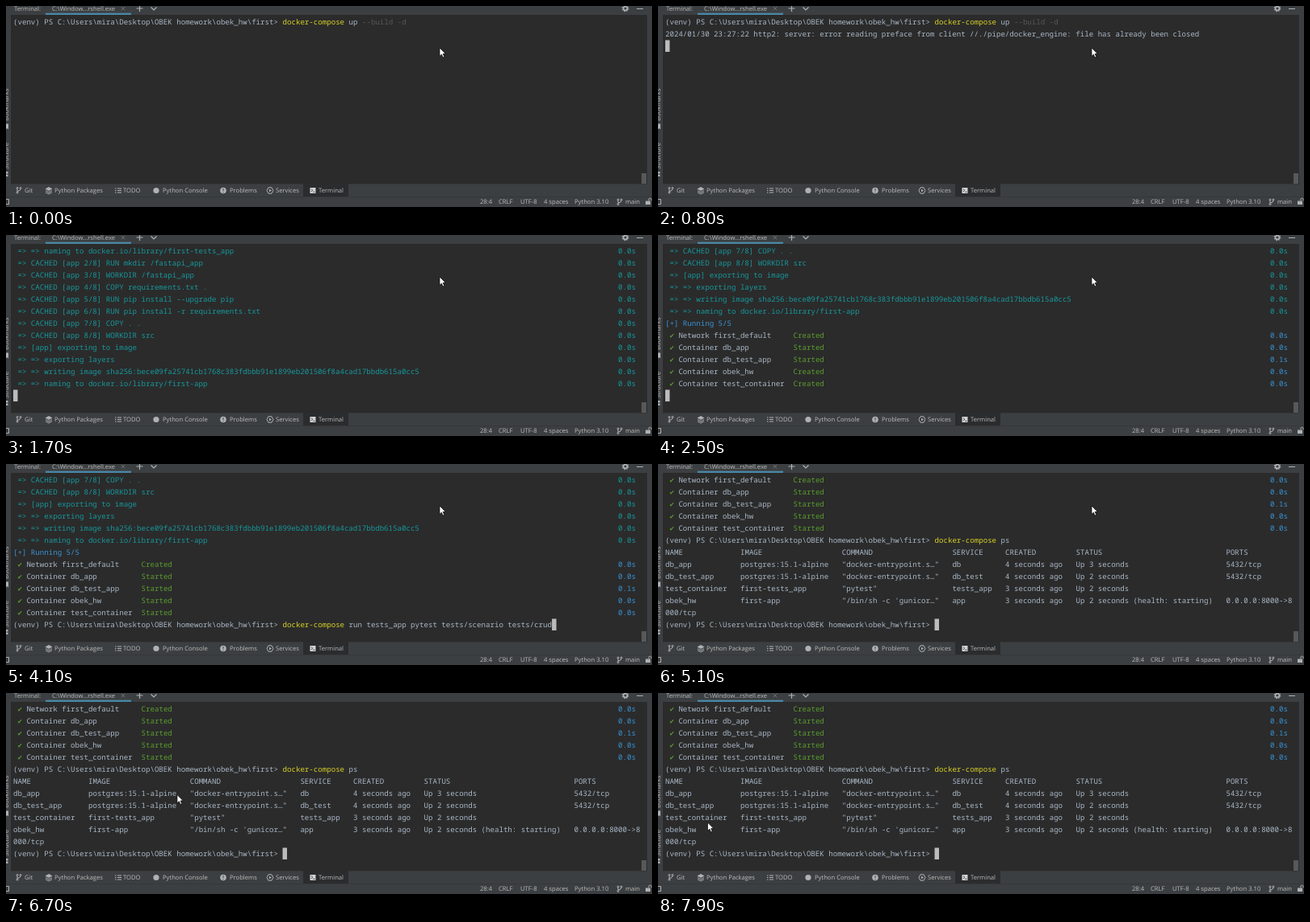
Recreate the animation shown at these times as an HTML page. Size 800 by 250 pixels, loop 8 s.

```html
<!DOCTYPE html>
<html lang="en">
<head>
<meta charset="utf-8">
<title>Terminal session</title>
<style>
html, body { margin: 0; width: 100%; height: 100%; overflow: hidden; background: #3c3f41; }
svg { display: block; width: 800px; height: 250px; }
text { white-space: pre; text-rendering: geometricPrecision; }
#ui text { font: 7.65px "Open Sans", "Noto Sans", sans-serif; fill: #bbb; }
#term text { font: 9.12px "Noto Sans Mono", "DejaVu Sans Mono", monospace; }
.line { fill: none; stroke: #afb1b3; }
</style>
</head>
<body>
<svg viewBox="0 0 800 250">
  <defs>
    <g id="branch" class="line">
      <path d="M-2 -1.5V2M2 -1.5Q2 1 -2 1.5"/>
      <circle cx="-2" cy="-2.5" r="1"/><circle cx="2" cy="-2.5" r="1"/><circle cx="-2" cy="3" r="1"/>
    </g>
  </defs>
  <rect width="800" height="250" fill="#3c3f41"/>
  <rect x="6" y="11" width="788" height="210" fill="#2b2b2b"/>
  <rect x="787" y="208" width="6" height="13" fill="#585858"/>
  <g id="term"></g>
  <g id="ui">
    <rect x="49" y="8.7" width="106" height="2.3" fill="#4a88a7"/>
    <g class="line">
      <path d="M142.8 1L147.2 5.4M147.2 1L142.8 5.4" stroke="#777" stroke-width=".9"/>
      <path d="M161.5 3H169.5M165.5 -1V7M179.5 1.5L183 5L186.5 1.5M781 3.5H789" stroke-width="1.2"/>
      <circle cx="767" cy="3" r="2.4" stroke-width="1.6"/>
      <circle cx="767" cy="3" r="3.7" stroke-width="1.2" stroke-dasharray="1.5 1.4"/>
    </g>
    <path d="M6 221.5H794M0 237.5H800" stroke="#353739"/>
    <rect x="368" y="221" width="56" height="16" fill="#2a2c2d"/>
    <use href="#branch" x="16" y="229"/>
    <g fill="#afb1b3">
      <path d="M48.5 227.5L53 225L57.5 227.5L53 230Z"/>
      <path d="M49 229.6L53 231.8L57 229.6M49 231.7L53 233.9L57 231.7" class="line"/>
      <path d="M135 227H136.5M138 227H143M135 229.5H136.5M138 229.5H143M135 232H136.5M138 232H143" class="line"/>
      <circle cx="186" cy="229.5" r="3.6"/>
      <circle cx="269" cy="229.5" r="3.8"/>
      <path d="M269 227V230M269 231V232" stroke="#3c3f41"/>
      <path d="M325 225.8H329L331 229.5L329 233.2H325L323 229.5Z" class="line"/>
      <path d="M326 227.7L329 229.5L326 231.3Z"/>
      <rect x="376.5" y="226" width="7" height="7" fill="#d0d2d3"/>
      <path d="M378 227.5L379.8 229.2L378 231M380.3 231.3H382.5" fill="none" stroke="#2a2c2d" stroke-width=".8"/>
      <path d="M-3 240.5H3.5V246.5H-3" class="line"/>
      <path d="M0 146.5H3V153.5L1.4 152L0 153.5Z"/>
      <path d="M0 206H2.5V208.5H0ZM0 209.5H2.5V212H0Z"/>
      <rect x="792" y="242.5" width="6" height="4.5"/>
      <path d="M796 242V240.5Q796 239 797.5 239Q799 239 799 240.5V242" class="line"/>
    </g>
    <use href="#branch" x="760" y="243.5"/>
    <text transform="translate(3 143) rotate(-90)">Bookmarks</text>
    <text transform="translate(3 203) rotate(-90)">Structure</text>
  </g>
  <path id="mouse" d="M0 0V10.4L2.4 8.2L4 12L5.8 11.2L4.2 7.5H7.4Z" fill="#fff" stroke="#000" stroke-width=".7"/>
</svg>
<script>
const NS = "http://www.w3.org/2000/svg";
const LOOP = 8000, CELL = 5.468, LEFT = 9, TOP = 12.5, ROW = 15, ROWS = 13;
const GREY = "#a9b7c6", TEAL = "#17979b", BLUE = "#3993d4", GREEN = "#5a9c2e", YELLOW = "#d9d126", DIM = "#555759";
const term = document.getElementById("term");
const mouse = document.getElementById("mouse");

function add(parent, tag, attrs, text = "") {
  const el = document.createElementNS(NS, tag);
  for (const k in attrs) el.setAttribute(k, attrs[k]);
  el.textContent = text;
  parent.append(el);
}

const labels = [
  [10, 6, "Terminal:"], [57, 6, "C:\\Window...rshell.exe"],
  [23, 232.3, "Git"], [60, 232.3, "Python Packages"], [145, 232.3, "TODO"], [194, 232.3, "Python Console"],
  [277, 232.3, "Problems"], [334, 232.3, "Services"], [387, 232.3, "Terminal"],
  [587, 246.3, "28:4"], [610, 246.3, "CRLF"], [637, 246.3, "UTF-8"], [666, 246.3, "4 spaces"],
  [704, 246.3, "Python 3.10"], [767, 246.3, "main"]
];
for (const [x, y, s] of labels) add(document.getElementById("ui"), "text", { x, y }, s);

// A line is a list of [column, text, colour].
const PROMPT = "(venv) PS C:\\Users\\mira\\Desktop\\OBEK homework\\obek_hw\\first> ";
const END = PROMPT.length;
const plain = s => [[0, s, GREY]];
const prompt = (args, hint = "") => {
  const line = plain(PROMPT);
  if (args) line.push([END, "docker-compose", YELLOW], [END + 15, args, GREY]);
  if (hint) line.push([END + 16 + args.length, hint, DIM]);
  return line;
};
const task = s => [[1, "=> " + s, TEAL], [137, "0.0s", TEAL]];

const steps = ["RUN mkdir /fastapi_app", "WORKDIR /fastapi_app", "COPY requirements.txt .",
  "RUN pip install --upgrade pip", "RUN pip install -r requirements.txt", "COPY . .", "WORKDIR src"];
const service = (name, sha) => [
  ...steps.map((s, i) => `CACHED [${name} ${i + 2}/8] ${s}`),
  `[${name}] exporting to image`, "=> exporting layers",
  "=> writing image sha256:" + sha, "=> naming to docker.io/library/first-" + name
].map(task);
const build = [
  [[0, "[+] Building 1.2s (20/20) FINISHED", BLUE]],
  task("[app internal] load build definition from Dockerfile"),
  task("[app internal] load .dockerignore"),
  ...service("tests_app", "4c1d70a93be25f8860b1f7e2ad935c64e08b1f92d7356ac0e41b98f25d70c3a6"),
  ...service("app", "bece09fa25741cb1768c383fdbbb91e1899eb201506f8a4cad17bbdb615a0cc5")
];

const units = ["Network first_default", "Container db_app", "Container db_test_app",
  "Container obek_hw", "Container test_container"];
function running(t) {
  const state = i => i && t >= (i < 3 ? 2300 : 2800) ? "Started" : "Created";
  return [
    [[0, "[+] Running 5/5", BLUE]],
    ...units.map((s, i) => [[1, "✔", GREEN], [3, s, GREY], [29, state(i), GREEN], [137, i === 2 ? "0.1s" : "0.0s", BLUE]])
  ];
}

const cols = [0, 17, 40, 65, 77, 93, 127];
const table = [
  "NAME|IMAGE|COMMAND|SERVICE|CREATED|STATUS|PORTS",
  'db_app|postgres:15.1-alpine|"docker-entrypoint.s…"|db|4 seconds ago|Up 3 seconds|5432/tcp',
  'db_test_app|postgres:15.1-alpine|"docker-entrypoint.s…"|db_test|4 seconds ago|Up 2 seconds|5432/tcp',
  'test_container|first-tests_app|"pytest"|tests_app|3 seconds ago|Up 2 seconds|',
  `obek_hw|first-app|"/bin/sh -c 'gunicor…"|app|3 seconds ago|Up 2 seconds (health: starting)|0.0.0.0:8000->8`,
  "000/tcp"
].map(r => r.split("|").map((s, i) => [cols[i], s, GREY]));

function screen(t) {
  const lines = [prompt("up", "--build -d")];
  let caret = 0;
  if (t >= 600) lines.push(plain("2024/01/30 23:27:22 http2: server: error reading preface from client //./pipe/docker_engine: file has already been closed"));
  if (t >= 1000) lines.push(...build.slice(0, (t - 900) / 100 * 4));
  if (t >= 1900) lines.push(...running(t));
  if (t < 300) return { lines, caret: -1 };
  if (t < 3000) lines.push([]);
  else {
    const args = t < 3700 ? "" : t < 4400 ? "run tests_app pytest tests/scenario tests/crud" : "ps";
    lines.push(prompt(args));
    caret = END + (args && 15 + args.length);
    if (t >= 4700 && t < 5000) { lines.push([]); caret = 0; }
    if (t >= 5000) { lines.push(...table, prompt("")); caret = END; }
  }
  return { lines, caret };
}

function draw(t) {
  const { lines, caret } = screen(t);
  const view = lines.slice(-ROWS);
  term.replaceChildren();
  view.forEach((line, row) => {
    for (const [col, s, fill] of line)
      add(term, "text", { x: LEFT + col * CELL, y: TOP + row * ROW + 10.8, fill }, s);
  });
  if (caret >= 0)
    add(term, "rect", { x: LEFT + caret * CELL, y: TOP + (view.length - 1) * ROW, width: CELL, height: 14.5, fill: "#bbb" });
}

let shown = -1;
function tick() {
  const t = performance.now() % LOOP;
  const step = Math.floor(t / 100) * 100;
  if (step !== shown) {
    draw(step);
    shown = step;
    const p = Math.min(1, Math.max(0, (step - 6200) / 800));
    const e = p * p * (3 - 2 * p);
    mouse.setAttribute("transform", `translate(${537 - 475.5 * e} ${52 + 109 * e})`);
  }
  requestAnimationFrame(tick);
}
tick();
</script>
</body>
</html>
```
